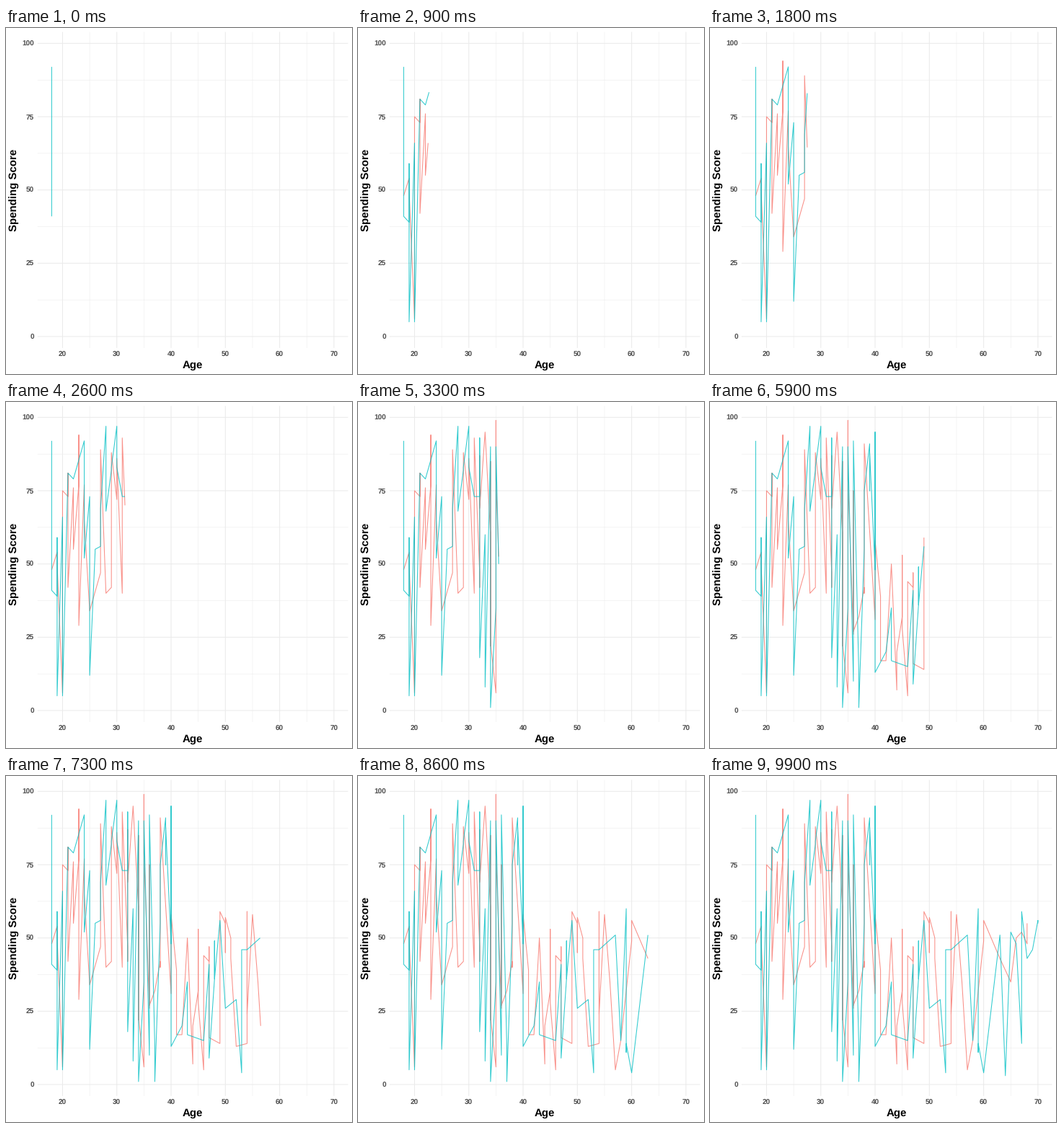
Recreate the animation shown at these times as a matplotlib script. Size 480x480 px, loop 10000 ms.

```python
import matplotlib as mpl
import matplotlib.pyplot as plt
import numpy as np
from matplotlib.animation import FuncAnimation

SIZE, DPI = 480, 100
FRAMES, INTERVAL = 100, 100
PX = 72 / DPI  # points per pixel

LEFT, RIGHT, TOP, BOTTOM = 43.8, 474.5, 5.5, 443.87
AGES = (18, 70)

mpl.rcParams.update({
    "font.family": "Liberation Sans",
    "font.weight": "bold",
    "text.hinting": "none",
    "path.simplify": False,
})

# Turning points of the spending score at each age.
women = {
    18: [48], 19: [54, 50], 20: [6, 75], 21: [73, 81, 42], 22: [76, 55],
    23: [77, 94, 29], 24: [77, 65], 25: [34], 27: [47, 89], 28: [40],
    29: [42, 88], 30: [72, 86], 31: [40, 93], 32: [47, 42, 87, 69],
    33: [95], 34: [60, 22, 85, 23], 35: [6, 99, 79], 36: [26, 75, 27],
    37: [32], 38: [42, 40, 91], 40: [31, 58], 41: [39, 17], 42: [17],
    43: [50], 44: [7, 20], 45: [32, 53, 28], 46: [5, 44], 47: [42, 47, 16],
    49: [14, 59], 50: [55, 45, 57], 51: [50, 43], 52: [13],
    54: [14, 59, 24], 55: [58], 56: [35], 57: [5], 58: [15], 60: [49, 56],
    63: [43], 65: [35], 66: [50], 67: [52], 68: [48, 55],
}
men = {
    18: [92, 41], 19: [39, 59, 5], 20: [66, 5], 21: [81], 22: [79],
    24: [92, 52], 25: [73, 12], 26: [54, 55], 27: [56, 69], 28: [97, 68],
    29: [82, 83], 30: [97, 83], 31: [73], 32: [73, 93, 18], 33: [60, 8],
    34: [90, 1], 35: [35, 90], 36: [10, 92], 37: [13, 1], 38: [55, 75],
    39: [91, 75, 88], 40: [48, 95, 13], 42: [20], 43: [35, 17], 46: [15],
    47: [41, 9], 48: [36, 49, 36], 49: [56], 50: [26], 52: [29],
    53: [4, 46], 54: [46], 57: [51], 58: [15], 59: [60, 11, 14], 60: [4],
    63: [51], 64: [3], 65: [52], 66: [48], 67: [14, 59], 68: [43],
    69: [46], 70: [56, 55],
}


def to_x(age):
    return LEFT + (age - 15.4) / 57.2 * (RIGHT - LEFT)


def to_y(score):
    return TOP + (103.9 - score) / 107.8 * (BOTTOM - TOP)


class Trace:
    """A line revealed along age, with each point tied to its nearest step."""

    def __init__(self, ax, scores, color):
        pts = np.array([(a, s) for a, ss in scores.items() for s in ss], float)
        start, end = AGES
        self.step = np.round((FRAMES - 1) * (pts[:, 0] - start) / (end - start))
        self.xy = np.column_stack([to_x(pts[:, 0]), to_y(pts[:, 1])])
        self.line, = ax.plot([], [], color=color, alpha=0.8, lw=1.07 * PX,
                             solid_capstyle="butt", solid_joinstyle="round",
                             snap=False, zorder=3)

    def reveal(self, step):
        n = np.searchsorted(self.step, step, side="right")
        xy = self.xy[:n]
        if n < len(self.xy):
            t0, t1 = self.step[n - 1:n + 1]
            t = (step - t0) / (t1 - t0)
            tip = (1 - t) * self.xy[n - 1] + t * self.xy[n]
            xy = np.vstack([xy, tip])
        self.line.set_data(xy[:, 0], xy[:, 1])
        return self.line


def draw_grid(ax, ages, scores, width):
    style = dict(color="#EBEBEB", lw=width * PX, snap=False,
                 solid_capstyle="butt", zorder=1)
    for s in scores:
        ax.plot([LEFT, RIGHT], [to_y(s)] * 2, **style)
    for a in ages:
        ax.plot([to_x(a)] * 2, [TOP, BOTTOM], **style)


def draw_labels(ax):
    tick = dict(color="#4D4D4D", fontsize=10 * PX, va="baseline")
    for s in range(0, 101, 25):
        ax.text(38.85, to_y(s) + 3.6, str(s), ha="right", **tick)
    for a in range(20, 71, 10):
        ax.text(to_x(a), 456, str(a), ha="center", **tick)
    title = dict(color="black", fontsize=15 * PX, ha="center")
    ax.text((LEFT + RIGHT) / 2, 471.7, "Age", va="baseline", **title)
    ax.text(16.3, (TOP + BOTTOM) / 2, "Spending Score", rotation=90,
            rotation_mode="anchor", va="baseline", **title)


fig = plt.figure(figsize=(SIZE / DPI, SIZE / DPI), dpi=DPI, facecolor="white")
ax = fig.add_axes([0, 0, 1, 1])
ax.set(xlim=(0, SIZE), ylim=(SIZE, 0))
ax.axis("off")

draw_grid(ax, range(25, 66, 10), np.arange(12.5, 100, 25), 0.53)
draw_grid(ax, range(20, 71, 10), range(0, 101, 25), 1.07)
draw_labels(ax)
traces = [Trace(ax, women, "#F8766D"), Trace(ax, men, "#00BFC4")]


def update(step):
    return [trace.reveal(step) for trace in traces]


anim = FuncAnimation(fig, update, frames=FRAMES, interval=INTERVAL,
                     init_func=lambda: update(0), repeat=True,
                     repeat_delay=0, blit=True)
plt.show()
```
